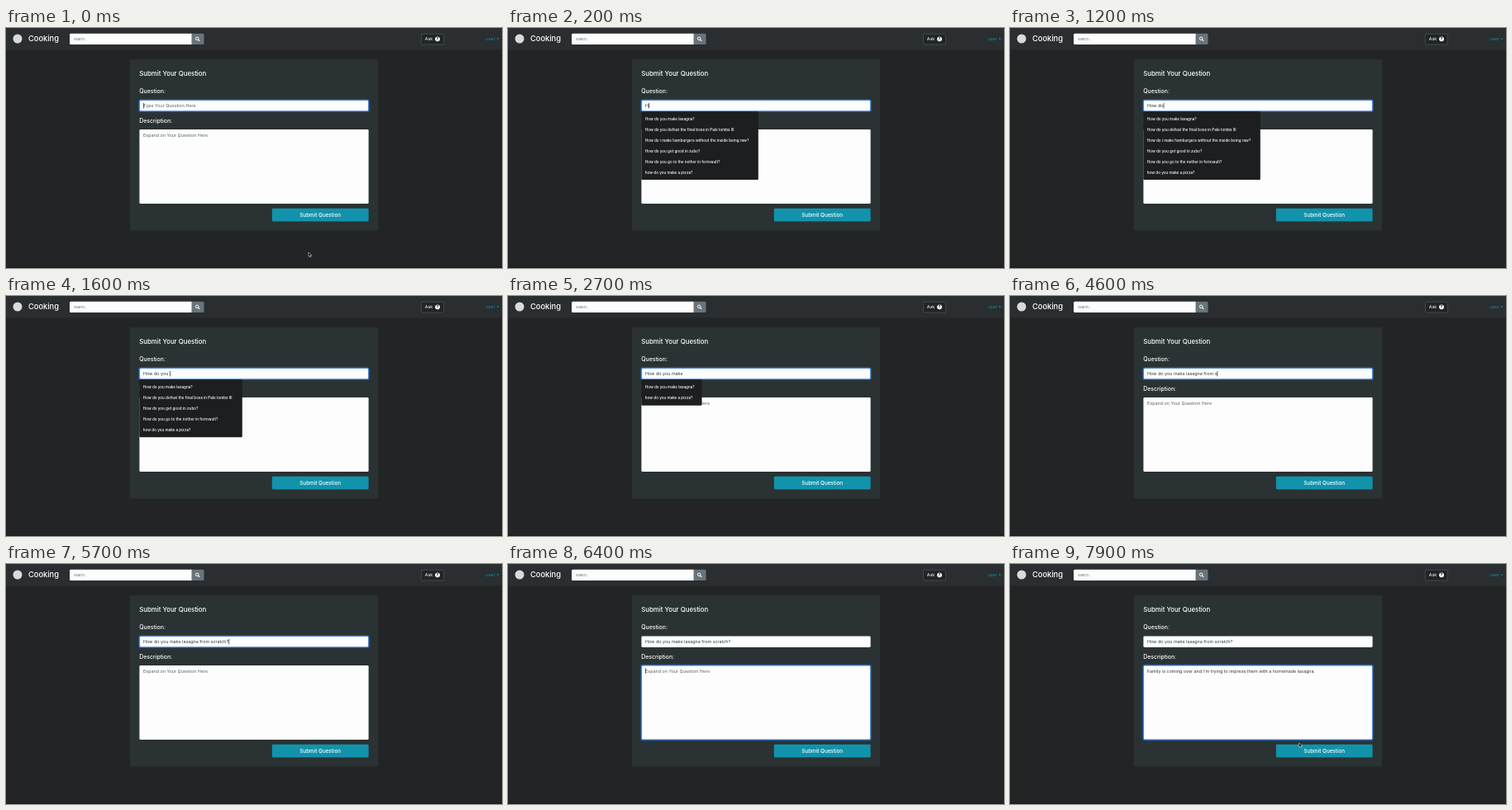
These frames come from a looping animation (600 by 291 pixels, 8000 ms). An HTML page:

```html
<!DOCTYPE html>
<html lang="en">
<head>
<meta charset="utf-8">
<title>Submit a question</title>
<style>
  html, body { margin: 0; width: 100%; height: 100%; overflow: hidden; background: #222425; }
  svg { display: block; }
  text { font-family: Inter, "Open Sans", sans-serif; font-size: 5.38px; fill: #fff; white-space: pre; }
  .medium { font-weight: 500; }
  .label { font-size: 6.9px; }
  .typed { fill: #2f363b; }
  .hint { fill: #596066; }
  .glow { fill: none; stroke: #1c5aa6; stroke-width: 1.6; }
  .edge { fill: none; stroke: #6ba5ee; stroke-width: .6; }
  #list text { font-size: 4.6px; font-weight: 500; }
</style>
</head>
<body>
<svg width="600" height="291" viewBox="0 0 600 291">
  <rect width="600" height="291" fill="#222425"/>
  <rect y="290" width="600" height="1" fill="#191a1b"/>

  <rect width="600" height="26.5" fill="#2a2e30"/>
  <circle cx="14" cy="13" r="5.5" fill="#d9dada"/>
  <text class="medium" x="27" y="16" style="font-size:9.3px">Cooking</text>
  <rect x="77" y="6.8" width="149" height="13.2" rx="1.5" fill="#fdfdfd"/>
  <text class="hint" x="82" y="15" style="font-size:3.9px">Search...</text>
  <path d="M224.5 6.8h13.5a1.5 1.5 0 0 1 1.5 1.5v10.2a1.5 1.5 0 0 1-1.5 1.5h-13.5z" fill="#69737a"/>
  <g fill="none" stroke="#fff">
    <circle cx="231.2" cy="12.8" r="1.8"/>
    <path d="M232.5 14.1l1.8 1.8" stroke-width="1.2"/>
  </g>
  <rect x="502.4" y="7.2" width="27.2" height="12.8" rx="1.5" fill="#212527" stroke="#50575b" stroke-width=".7"/>
  <text x="506.8" y="15.3">Ask</text>
  <circle cx="522" cy="13.3" r="2.9" fill="#fff"/>
  <text x="522" y="15.1" text-anchor="middle" style="font-size:4.8px;font-weight:800;fill:#212527">?</text>
  <text x="580.5" y="15.3" style="fill:#168fa8">user</text>
  <path d="M593.4 12.6h3.2l-1.6 1.7z" fill="#168fa8"/>

  <rect x="150" y="38.3" width="300" height="207.2" fill="#2b3233"/>
  <text class="medium" x="161.3" y="57.6" style="font-size:7.8px">Submit Your Question</text>
  <text class="medium label" x="161.3" y="79.2">Question:</text>
  <text class="medium label" x="161.3" y="114.6">Description:</text>

  <rect x="161.4" y="87.4" width="277.2" height="13.5" rx="1.4" fill="#fdfdfd"/>
  <rect x="161.4" y="122.9" width="277.2" height="90.2" rx="1.4" fill="#fdfdfd"/>
  <g id="focusTop">
    <rect class="glow" x="161" y="87" width="278" height="14.3" rx="1.8"/>
    <rect class="edge" x="161.7" y="87.7" width="276.6" height="12.9" rx="1.3"/>
  </g>
  <g id="focusBottom">
    <rect class="glow" x="161" y="122.5" width="278" height="91" rx="1.8"/>
    <rect class="edge" x="161.7" y="123.2" width="276.6" height="89.6" rx="1.3"/>
  </g>
  <text id="question" x="166" y="96.2"></text>
  <text id="details" x="166" y="131.6"></text>
  <rect id="caret" width=".7" height="6.4" fill="#222"/>

  <rect id="button" x="321.8" y="218.8" width="116.8" height="15.6" rx="1.4"/>
  <text class="medium" x="380.2" y="229" text-anchor="middle" style="font-size:6.3px">Submit Question</text>

  <g id="list">
    <rect y="101.2" x="161.3" rx="1.2" fill="#1d1e20"/>
  </g>
  <path id="pointer" d="M0 0v5l1.2-1 .8 1.8 1-.5-.8-1.7h1.6z" fill="#000" stroke="#fff" stroke-width=".5"/>
</svg>
<script>
const $ = id => document.getElementById(id);
const title = "How do you make lasagna from scratch?";
const story = "Family is coming over and i'm trying to impress them with a homemade lasagna.";
const suggestions = [
  "How do you make lasagna?",
  "How do you defeat the final boss in Pale tombs III",
  "How do i make hamburgers without the inside being raw?",
  "How do you get good in zubo?",
  "How do you go to the nether in fernvault?",
  "how do you make a pizza?"
];
const listWidth = { 6: 141.5, 5: 124.5, 2: 73.2, 1: 73.2 };

// Key press times in tenths of a second, one per letter of the title
const keys = [2, 4, 5, 10, 11, 12, 13, 13, 14, 15, 16, 18, 19, 20, 21, 22, 28, 29, 31, 33, 34, 36,
  38, 39, 42, 44, 44, 45, 45, 46, 48, 49, 50, 52, 53, 55, 57];
const caretOff = [[27, 28], [68, 70], [76, 80]];
// [tenth, x, y]
const moves = [[0, 366, 272], [2, -20, -20], [73, 366, 272], [74, 363, 268],
  [76, 361, 262], [77, 357, 244], [78, 352, 225], [79, 349.6, 217]];

const rows = suggestions.map(s => {
  const row = document.createElementNS("http://www.w3.org/2000/svg", "text");
  row.textContent = s;
  row.setAttribute("x", 165.8);
  return $("list").appendChild(row);
});
const panel = $("list").querySelector("rect");

function setField(id, value, hint) {
  const field = $(id);
  field.textContent = value || hint;
  field.setAttribute("class", value ? "typed" : "hint");
  return value ? field.getComputedTextLength() : 0;
}

function showList(typed) {
  let n = 0;
  rows.forEach((row, i) => {
    const match = typed && suggestions[i].toLowerCase().startsWith(typed.toLowerCase());
    row.setAttribute("visibility", match ? "visible" : "hidden");
    if (match) row.setAttribute("y", 112.4 + 12.85 * n++);
  });
  panel.setAttribute("width", listWidth[n] || 0);
  panel.setAttribute("height", n ? 12.85 * n + 5.8 : 0);
}

function draw(tick) {
  const typed = title.slice(0, keys.filter(k => k <= tick).length);
  const titleEnd = setField("question", typed, "Type Your Question Here");
  const storyEnd = setField("details", tick >= 70 ? story : "", "Expand on Your Question Here");
  showList(typed);

  const focus = Math.min(1, Math.max(0, (tick - 61) / 3));
  $("focusTop").setAttribute("opacity", 1 - focus);
  $("focusBottom").setAttribute("opacity", focus);

  const below = tick >= 62;
  $("caret").setAttribute("x", 166.1 + (below ? storyEnd : titleEnd));
  $("caret").setAttribute("y", below ? 126.3 : 91);
  $("caret").setAttribute("opacity", caretOff.some(([a, b]) => tick >= a && tick < b) ? 0 : 1);

  const [, x, y] = moves.filter(m => m[0] <= tick).pop();
  $("pointer").setAttribute("transform", `translate(${x} ${y})`);
  $("button").setAttribute("fill", y > 218.8 && y < 234.4 ? "#10869c" : "#1193ac");
}

let last = -1;
function frame() {
  const tick = Math.floor(performance.now() % 8000 / 100);
  if (tick !== last) draw(last = tick);
  requestAnimationFrame(frame);
}
frame();
</script>
</body>
</html>
```
